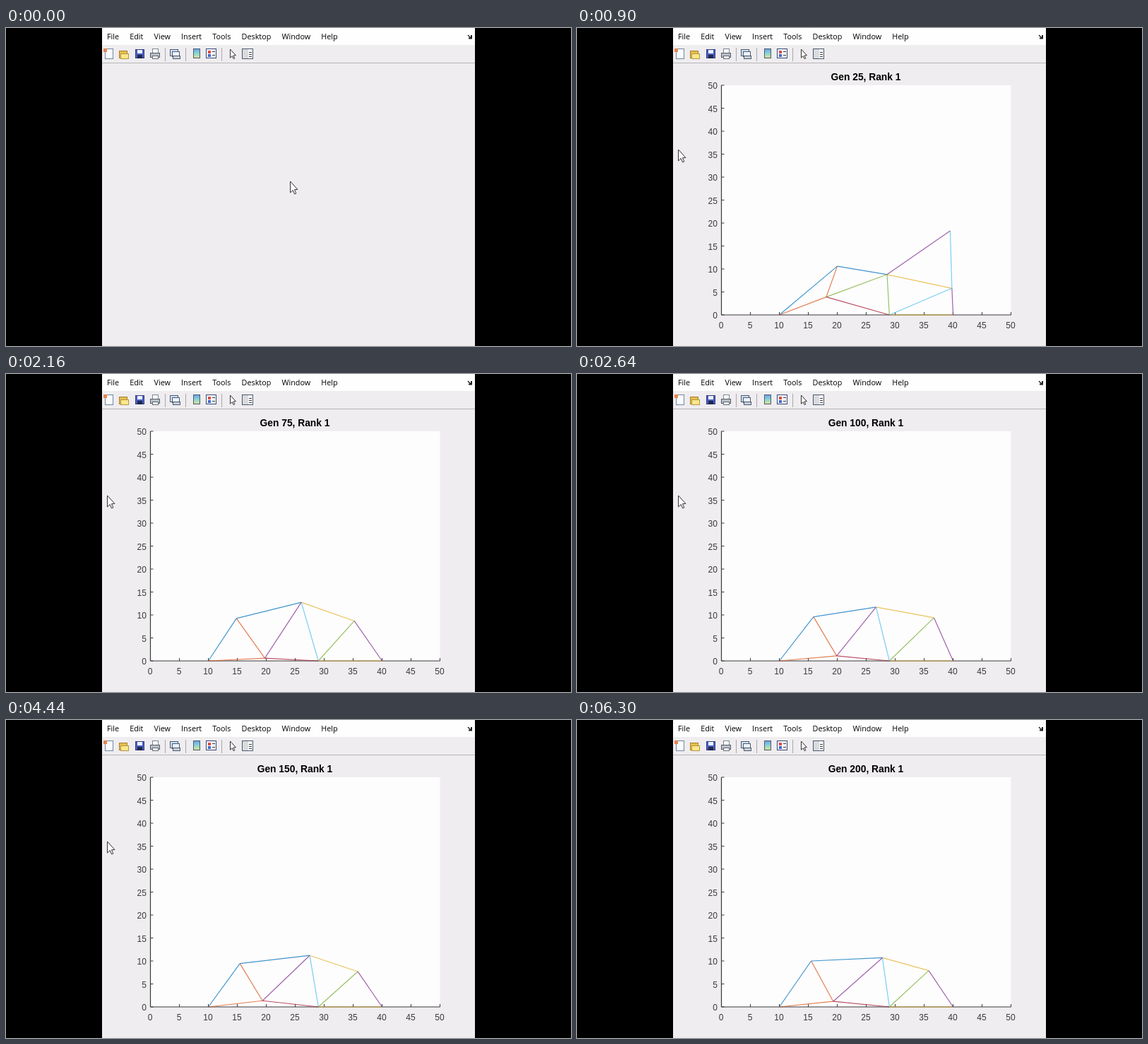
Animation of 800x450 px, one loop 6360 ms. Source, as an HTML page with a canvas:

```html
<!DOCTYPE html>
<html lang="en">
<head>
<meta charset="utf-8">
<title>Truss optimisation</title>
<style>
  html, body { margin: 0; width: 100%; height: 100%; overflow: hidden; background: #000; }
  canvas { display: block; width: 800px; height: 450px; }
</style>
</head>
<body>
<canvas id="stage" width="800" height="450"></canvas>
<script>
const ctx = document.getElementById('stage').getContext('2d');
const LOOP = 6360, STEP = 60;
const FIRST = 230, HOLD = 790;            // first plot, time per plot
const LEFT = 136, WIDTH = 528;            // window
const INK = '#3a3a3a', EDGE = '#4c5a70';
const SANS = '"Liberation Sans", Arial, sans-serif';

const COLORS = {
  blue: '#0072bd', orange: '#d95319', yellow: '#e3b128', purple: '#7e2f8e',
  green: '#77ac30', cyan: '#4dbeee', red: '#a2142f'
};
const EARLY = { blue: 'AB BD', orange: 'AC BC', yellow: 'DG EH', purple: 'DF GH', green: 'CD DE', cyan: 'EG FG', red: 'CE' };
const LATE = { blue: 'AB BD', orange: 'AC BC', yellow: 'DF EH', purple: 'CD FH', green: 'EF', cyan: 'DE', red: 'CE' };

// Joint positions in axis units; the other generations lie between these.
const SUPPORTS = { A: [10, 0], E: [29, 0], H: [40, 0] };
const KEYS = {
  25: { B: [20, 10.6], C: [18.1, 3.9], D: [28.6, 8.8], F: [39.5, 18.3], G: [39.8, 5.8] },
  50: { B: [13.8, 8.9], C: [19.6, 0.1], D: [25.4, 13.8], F: [33.7, 8] },
  100: { B: [15.9, 9.6], C: [19.9, 1.1], D: [26.7, 11.7], F: [36.7, 9.4] },
  125: { B: [15.4, 8.9], C: [19.4, 1.5], D: [27.2, 11.7], F: [35.8, 7.5] },
  175: { B: [15.5, 10], C: [19.3, 1.2], D: [27.8, 10.7], F: [35.8, 7.9] }
};

const mix = (a, b, k) => a + (b - a) * k;
const px = v => 204.5 + 8.2 * v;
const py = v => 406 - 6.5 * v;

function rect(x, y, w, h, fill, stroke) {
  ctx.fillStyle = fill;
  ctx.fillRect(x, y, w, h);
  if (!stroke) return;
  ctx.strokeStyle = stroke;
  ctx.lineWidth = 1;
  ctx.strokeRect(x + .5, y + .5, w - 1, h - 1);
}

function line(x1, y1, x2, y2, color, width = 1) {
  ctx.strokeStyle = color;
  ctx.lineWidth = width;
  ctx.beginPath();
  ctx.moveTo(x1, y1);
  ctx.lineTo(x2, y2);
  ctx.stroke();
}

function text(str, x, y, font, color, align = 'left') {
  ctx.font = font;
  ctx.fillStyle = color;
  ctx.textAlign = align;
  ctx.fillText(str, x, y);
}

function pointer(x, y, scale) {
  const shape = [[0, 0], [0, 16], [3.7, 12.6], [6.2, 18], [8.3, 17], [6, 11.7], [10.4, 11.5]];
  ctx.beginPath();
  for (const [dx, dy] of shape) ctx.lineTo(x + dx * scale, y + dy * scale);
  ctx.closePath();
  ctx.fillStyle = '#fff';
  ctx.fill();
  ctx.strokeStyle = '#333';
  ctx.lineWidth = 1;
  ctx.stroke();
}

function drawMenu() {
  rect(LEFT, 0, WIDTH, 24, '#fefefe');
  let x = 143;
  for (const item of ['File', 'Edit', 'View', 'Insert', 'Tools', 'Desktop', 'Window', 'Help']) {
    text(item, x, 16, '10.8px "Open Sans", sans-serif', '#000');
    x += ctx.measureText(item).width + 15.15;
  }
  line(654, 10, 659, 15, '#222', 1.4);
  line(655, 14.5, 660, 14.5, '#222', 2);
  line(659, 10, 659, 15, '#222', 2);
}

const icons = {
  page(x) {
    rect(x + 2, 29, 12, 15, '#fbfcff', '#7088a2');
    rect(x, 29, 5, 5, '#e5844f');
  },
  folder(x) {
    rect(x + 1, 32, 12, 11, '#e9bd4c', '#a58130');
    rect(x + 3, 36, 12, 8, '#fae78e', '#b5963c');
  },
  disk(x) {
    rect(x + 1, 30, 13, 13, '#4a5fc0', '#303c86');
    rect(x + 4, 31, 7, 5, '#eef1fb');
    rect(x + 4, 38, 7, 5, '#20264c');
  },
  printer(x) {
    rect(x + 3, 29, 9, 8, '#fdfdfd', '#7b8794');
    rect(x, 35, 14, 7, '#b9bfc8', '#565d66');
    rect(x + 3, 39, 9, 5, '#eef0f3', '#6b727a');
  },
  link(x) {
    rect(x, 30, 12, 10, '#cfe0f4', EDGE);
    rect(x + 3, 33, 11, 8, '#eef4fb', EDGE);
    rect(x + 4, 39, 11, 5, '#c9d0d8', EDGE);
  },
  colorbar(x) {
    const shade = ctx.createLinearGradient(0, 30, 0, 43);
    ['#6aa6e8', '#8fd8cf', '#e8e38c'].forEach((c, i) => shade.addColorStop(i / 2, c));
    rect(x, 29, 10, 14, shade, EDGE);
  },
  legend(x) {
    rect(x, 29, 15, 14, '#fbfcff', '#35477a');
    ['#dc4b43', '#4468cf'].forEach((c, i) => {
      rect(x + 3, 32 + 5 * i, 4, 4, c);
      rect(x + 9, 33 + 5 * i, 4, 1, '#333');
    });
  },
  select(x) { pointer(x + .5, 30, .76); },
  inspector(x) {
    rect(x, 29, 16, 15, '#fafafa', EDGE);
    rect(x + 1, 30, 8, 13, '#d9dbde');
    for (let i = 0; i < 3; i++) rect(x + 10, 34 + 3 * i, 4, 1, '#444');
  }
};

function drawToolbar() {
  const places = { page: 138, folder: 159, disk: 182, printer: 204, link: 232, colorbar: 265, legend: 283, select: 317, inspector: 334 };
  for (const name in places) icons[name](places[name]);
  for (const x of [225, 254, 305]) rect(x, 28, 1, 19, '#a9a8aa');
  rect(LEFT, 49, WIDTH, 1, '#b8b6b8');
}

function drawAxes() {
  rect(204.5, 81, 410, 325, '#fefdfe');
  line(px(0), py(50), px(0), py(0), INK, 1.2);
  line(px(0), py(0), px(50), py(0), INK, 1.2);
  for (let v = 0; v <= 50; v += 5) {
    line(px(v), py(0) - 4, px(v), py(0), INK);
    line(px(0), py(v), px(0) + 4, py(v), INK);
    text(v, px(v) - .5, 424.5, '12px ' + SANS, INK, 'center');
    text(v, 198.8, py(v) + 5.2, '12px ' + SANS, INK, 'right');
  }
}

function jointsAt(gen) {
  const gens = Object.keys(KEYS).map(Number);
  const lo = gens.filter(g => g <= gen).pop();
  const hi = gens.find(g => g >= gen) ?? lo;
  const k = hi > lo ? (gen - lo) / (hi - lo) : 0;
  const joints = { ...SUPPORTS };
  for (const n in KEYS[lo])
    joints[n] = KEYS[lo][n].map((v, i) => k ? mix(v, KEYS[hi][n][i], k) : v);
  return joints;
}

function drawTruss(gen) {
  const joints = jointsAt(gen), bars = joints.G ? EARLY : LATE;
  ctx.globalAlpha = .75;
  for (const color in bars)
    for (const [a, b] of bars[color].split(' ')) {
      const [p, q] = [joints[a], joints[b]];
      line(px(p[0]), py(p[1]), px(q[0]), py(q[1]), COLORS[color], 1.2);
    }
  ctx.globalAlpha = 1;
}

function drawPlot(gen) {
  drawAxes();
  text(`Gen ${gen}, Rank 1`, 409, 73.7, 'bold 13.8px ' + SANS, '#000', 'center');
  drawTruss(gen);
}

function drawPointer(t) {
  if (t >= 6180) return;
  const p = Math.min(1, t / 480), k = p * p * (3 - 2 * p);
  pointer(mix(402.5, 143.5, k), mix(217, 172, k), 1);
}

function draw(now) {
  const t = Math.floor(now % LOOP / STEP) * STEP;
  rect(0, 0, 800, 450, '#000');
  rect(LEFT, 0, WIDTH, 450, '#efedef');
  drawMenu();
  drawToolbar();
  if (t >= FIRST) drawPlot(25 * Math.min(8, 1 + Math.floor((t - FIRST) / HOLD)));
  drawPointer(t);
}

const start = performance.now();
function tick() {
  draw(performance.now() - start);
  requestAnimationFrame(tick);
}
tick();
</script>
</body>
</html>
```
